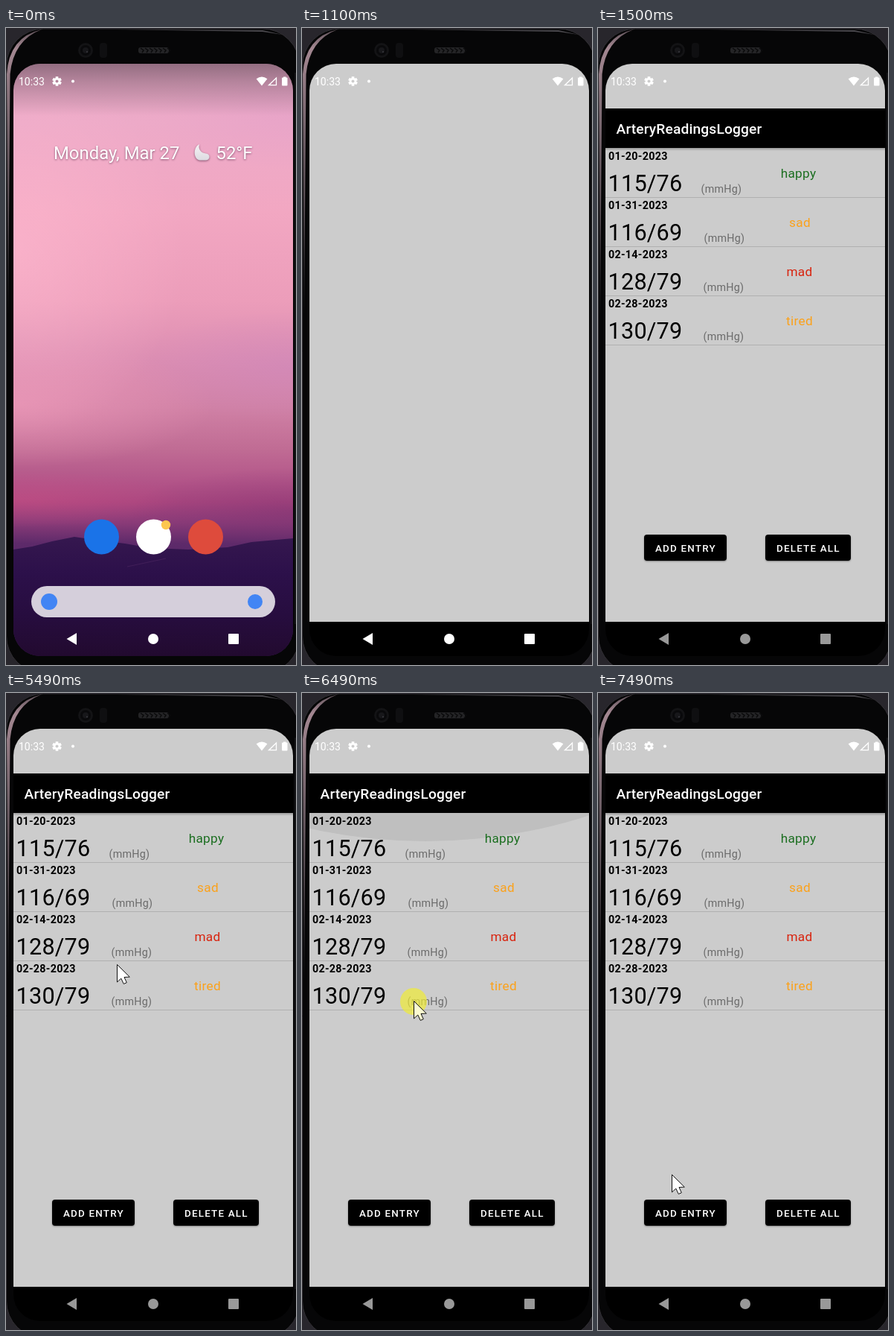
Write an HTML page with a canvas that moves like this. It is 390x855 px and loops after 8 s.

```html
<!DOCTYPE html>
<html lang="en">
<head>
<meta charset="utf-8">
<title>Reading log</title>
<style>
html, body { margin: 0; width: 100%; height: 100%; overflow: hidden; background: #28262c; }
canvas { display: block; width: 390px; height: 855px; }
</style>
</head>
<body>
<canvas id="stage"></canvas>
<script>
const W = 390, H = 855, LOOP = 8000;
const canvas = document.getElementById('stage');
const ctx = canvas.getContext('2d');
const dpr = window.devicePixelRatio || 1;
canvas.width = W * dpr;
canvas.height = H * dpr;

const GREY = '#cccccc';
const ROWS = [
  { date: '01-20-2023', value: '115/76', unitX: 138.5, mood: 'happy', moodX: 269.5, color: '#1b6e20' },
  { date: '01-31-2023', value: '116/69', unitX: 142.5, mood: 'sad', moodX: 271.5, color: '#fba11a' },
  { date: '02-14-2023', value: '128/79', unitX: 141.5, mood: 'mad', moodX: 271, color: '#d8230e' },
  { date: '02-28-2023', value: '130/79', unitX: 141.5, mood: 'tired', moodX: 271, color: '#fba11a' }
];

function text(str, x, y, size, color, { weight = 400, spacing = 0, align = 'left' } = {}) {
  ctx.font = `${weight} ${size}px Roboto, sans-serif`;
  ctx.letterSpacing = spacing + 'px';
  ctx.textAlign = align;
  ctx.fillStyle = color;
  ctx.fillText(str, x, y);
}

function rect(x, y, w, h, color) {
  ctx.fillStyle = color;
  ctx.fillRect(x, y, w, h);
}

function round(x, y, w, h, r, color) {
  ctx.beginPath();
  ctx.roundRect(x, y, w, h, r);
  ctx.fillStyle = color;
  ctx.fill();
}

function disc(x, y, r, color) {
  ctx.beginPath();
  ctx.arc(x, y, r, 0, Math.PI * 2);
  ctx.fillStyle = color;
  ctx.fill();
}

function poly(points, color) {
  ctx.beginPath();
  points.forEach(([x, y]) => ctx.lineTo(x, y));
  ctx.closePath();
  ctx.fillStyle = color;
  ctx.fill();
}

function gradient(x0, y0, x1, y1, stops) {
  const g = ctx.createLinearGradient(x0, y0, x1, y1);
  stops.forEach(([at, color]) => g.addColorStop(at, color));
  return g;
}

function glow(x, y, rx, ry, rgb, alpha) {
  ctx.save();
  ctx.translate(x, y);
  ctx.scale(rx, ry);
  const g = ctx.createRadialGradient(0, 0, 0, 0, 0, 1);
  g.addColorStop(0, `rgba(${rgb},${alpha})`);
  g.addColorStop(1, `rgba(${rgb},0)`);
  rect(-1, -1, 2, 2, g);
  ctx.restore();
}

function shadow(color, blur, y) {
  ctx.shadowColor = color;
  ctx.shadowBlur = blur * dpr;
  ctx.shadowOffsetY = y * dpr;
}

function phone() {
  rect(0, 0, W, H, '#28262c');
  round(0.5, 1, 394.5, 865, 50, '#060607');
  ctx.strokeStyle = '#333136';
  ctx.lineWidth = 1;
  ctx.stroke();
  rect(388, 60, 2, 740, '#131315');

  // rim highlights: a thin one on top, a tapering one on the left
  poly([[150, 2], [345, 3], [372, 9], [345, 5]], '#4a484d');
  ctx.beginPath();
  ctx.moveTo(3, 385);
  ctx.lineTo(1, 62);
  ctx.quadraticCurveTo(4, 12, 48, 2);
  ctx.quadraticCurveTo(10, 16, 5.5, 62);
  ctx.closePath();
  ctx.fillStyle = gradient(0, 0, 0, 385, [[0, '#5d5057'], [0.07, '#a38791'], [0.35, '#77666e'], [1, '#2a282b']]);
  ctx.fill();

  // camera, sensor and speaker
  disc(107, 30, 10, '#131315');
  disc(107, 30, 7, '#09090b');
  disc(107, 30, 4, '#17171a');
  disc(109, 32, 1, '#3b3b40');
  round(126, 20, 10, 20, 4, '#0f0f11');
  round(178, 26, 41, 8, 3, '#242426');
  ctx.strokeStyle = '#0b0b0c';
  ctx.lineWidth = 1.5;
  for (let x = 181; x < 218; x += 6) {
    ctx.beginPath();
    ctx.moveTo(x, 27);
    ctx.lineTo(x + 4, 30);
    ctx.lineTo(x + 2, 33);
    ctx.stroke();
  }
}

function gear(x, y) {
  ctx.save();
  ctx.translate(x, y);
  for (let i = 0; i < 6; i++) {
    rect(-1.8, -6.3, 3.6, 4, '#fff');
    ctx.rotate(Math.PI / 3);
  }
  ctx.beginPath();
  ctx.arc(0, 0, 3.4, 0, Math.PI * 2);
  ctx.strokeStyle = '#fff';
  ctx.lineWidth = 2.6;
  ctx.stroke();
  ctx.restore();
}

function statusBar() {
  text('10:33', 17, 77, 14, '#fff');
  gear(68.5, 71.5);
  disc(90, 71.5, 2, '#fff');

  ctx.beginPath();
  ctx.moveTo(344, 77.5);
  ctx.lineTo(336.6, 68.3);
  ctx.quadraticCurveTo(344, 62.8, 351.4, 68.3);
  ctx.fillStyle = '#fff';
  ctx.fill();

  ctx.beginPath();
  ctx.moveTo(353.5, 76.7);
  ctx.lineTo(363.5, 76.7);
  ctx.lineTo(363.5, 67);
  ctx.closePath();
  ctx.strokeStyle = '#fff';
  ctx.lineWidth = 1.3;
  ctx.stroke();

  rect(373, 65.5, 3.5, 2, '#fff');
  round(371, 66.5, 7.5, 11, 1, '#fff');
}

function navBar(color) {
  poly([[81.5, 820], [95, 812], [95, 828]], color);
  disc(198, 820, 7, color);
  round(299, 813, 14, 14, 1, color);
}

function wallpaper() {
  rect(10, 48, 376, 795, gradient(0, 48, 0, 843, [
    [0, '#eaa9c6'], [0.1, '#edaac8'], [0.25, '#f2a7c2'], [0.4, '#ec9dba'], [0.5, '#dc8eb2'],
    [0.58, '#d081a5'], [0.65, '#c06c94'], [0.7, '#b4578a'], [0.74, '#a9467f'], [0.775, '#8a3b78'],
    [0.81, '#5d2a6a'], [1, '#3a1856']
  ]));
  glow(10, 300, 230, 250, '255,186,208', 0.6);
  glow(10, 505, 270, 85, '240,155,186', 0.65);
  glow(386, 455, 220, 75, '204,134,188', 0.5);
  glow(20, 632, 220, 38, '210,82,134', 0.4);
  glow(386, 650, 220, 60, '120,48,112', 0.4);
  glow(386, 120, 200, 70, '225,155,200', 0.4);

  poly([
    [10, 700], [35, 696], [62, 689], [92, 683], [120, 687], [160, 692], [195, 698],
    [245, 700], [298, 697], [330, 690], [386, 685], [386, 843], [10, 843]
  ], gradient(0, 685, 0, 843, [[0, '#35174f'], [0.3, '#2c104a'], [0.65, '#270d3f'], [1, '#220a2f']]));
  ctx.strokeStyle = 'rgba(110,60,120,.3)';
  ctx.lineWidth = 1;
  ctx.beginPath();
  ctx.moveTo(163, 723);
  ctx.lineTo(215, 712);
  ctx.stroke();

  rect(10, 48, 376, 70, gradient(0, 48, 0, 118, [[0, 'rgba(60,50,60,.5)'], [0.35, 'rgba(60,50,60,.3)'], [1, 'rgba(60,50,60,0)']]));
}

function weatherIcon() {
  ctx.beginPath();
  ctx.moveTo(260, 156);
  ctx.bezierCurveTo(251, 160, 252, 177, 261, 177.5);
  ctx.lineTo(269, 177.5);
  ctx.bezierCurveTo(275, 177, 275, 169, 269, 168.5);
  ctx.bezierCurveTo(262, 168, 258, 162, 260, 156);
  ctx.fillStyle = gradient(0, 156, 0, 178, [[0, '#f6f2f4'], [1, '#dcdbe1']]);
  ctx.fill();
}

function home() {
  wallpaper();
  ctx.save();
  shadow('rgba(60,20,50,.6)', 3, 1);
  text('Monday, Mar 27', 64, 176, 23.9, '#fff');
  text('52°F', 282.5, 176, 23.9, '#fff');
  weatherIcon();
  ctx.restore();

  disc(128.5, 683, 23.5, '#1a73e8');
  disc(198.5, 683, 23.5, '#fff');
  disc(215, 667, 6.2, '#fdc64f');
  disc(268.5, 683, 23.5, '#de4b3c');

  round(34, 749, 328, 42, 21, '#d5cfdb');
  disc(58, 770, 11, '#4285f4');
  disc(335, 770, 10, '#4285f4');
  navBar('#fff');
}

function blankApp() {
  rect(10, 48, 376, 749, GREY);
  rect(10, 797, 376, 46, '#000');
}

function button(label, x, w, textX) {
  ctx.save();
  shadow('rgba(0,0,0,.4)', 2, 1);
  round(x, 680, w, 35, 4, '#000');
  ctx.restore();
  text(label, textX, 703, 13.4, '#fff', { weight: 500, spacing: 1.2 });
}

function entry(row, i) {
  const y = 161 + i * 66;
  text(row.date, 14, y + 16, 14.3, '#000', { weight: 700, spacing: 0.3 });
  text(row.value, 13.6, y + 58, 30.6, '#000', { spacing: 0.2 });
  text('(mmHg)', row.unitX, y + 60, 14.3, '#6a6a6a', { spacing: 0.25 });
  text(row.mood, row.moodX, y + 40, 17.2, row.color, { spacing: 0.3, align: 'center' });
  rect(10, y + 66, 376, 1, '#b0b0b0');
}

function ripple() {
  ctx.save();
  ctx.beginPath();
  ctx.rect(10, 161, 376, 66);
  ctx.clip();
  disc(166, 199 - 716, 716, '#bfbfbf');
  ctx.restore();
}

function app(pressed) {
  blankApp();
  rect(10, 161, 376, 4, gradient(0, 161, 0, 165, [[0, 'rgba(0,0,0,.25)'], [1, 'rgba(0,0,0,0)']]));
  if (pressed) ripple();
  rect(10, 108, 376, 53, '#000');
  text('ArteryReadingsLogger', 24.5, 142, 19.2, '#fff', { weight: 500, spacing: 0.15 });
  ROWS.forEach(entry);
  button('ADD ENTRY', 62, 111, 77);
  button('DELETE ALL', 225, 115, 240);
  navBar('#999');
}

function pointer(x, y, fill) {
  ctx.save();
  ctx.translate(x + 0.5, y + 0.5);
  poly([[0, 0], [0, 23.5], [5.3, 18.6], [8.8, 26], [12.8, 24.2], [9.5, 17], [16.8, 16.6]], fill);
  ctx.strokeStyle = '#111';
  ctx.lineWidth = 1;
  ctx.stroke();
  ctx.restore();
}

function draw(t) {
  ctx.setTransform(dpr, 0, 0, dpr, 0, 0);
  phone();
  ctx.save();
  ctx.beginPath();
  ctx.roundRect(10, 48, 376, 795, 36);
  ctx.clip();
  if (t < 500) {
    home();
  } else if (t < 1500) {
    blankApp();
    navBar('#fff');
  } else {
    app(t >= 6490 && t < 7490);
  }
  statusBar();
  ctx.restore();

  if (t >= 7490) {
    pointer(99, 646, '#fff');
  } else if (t >= 6490) {
    disc(150, 414, 18, 'rgba(240,236,55,.7)');
    pointer(150, 413, '#fbfad0');
  } else if (t >= 5490) {
    pointer(149, 364, '#fff');
  }
}

function frame() {
  draw(performance.now() % LOOP);
  requestAnimationFrame(frame);
}
frame();
</script>
</body>
</html>
```
